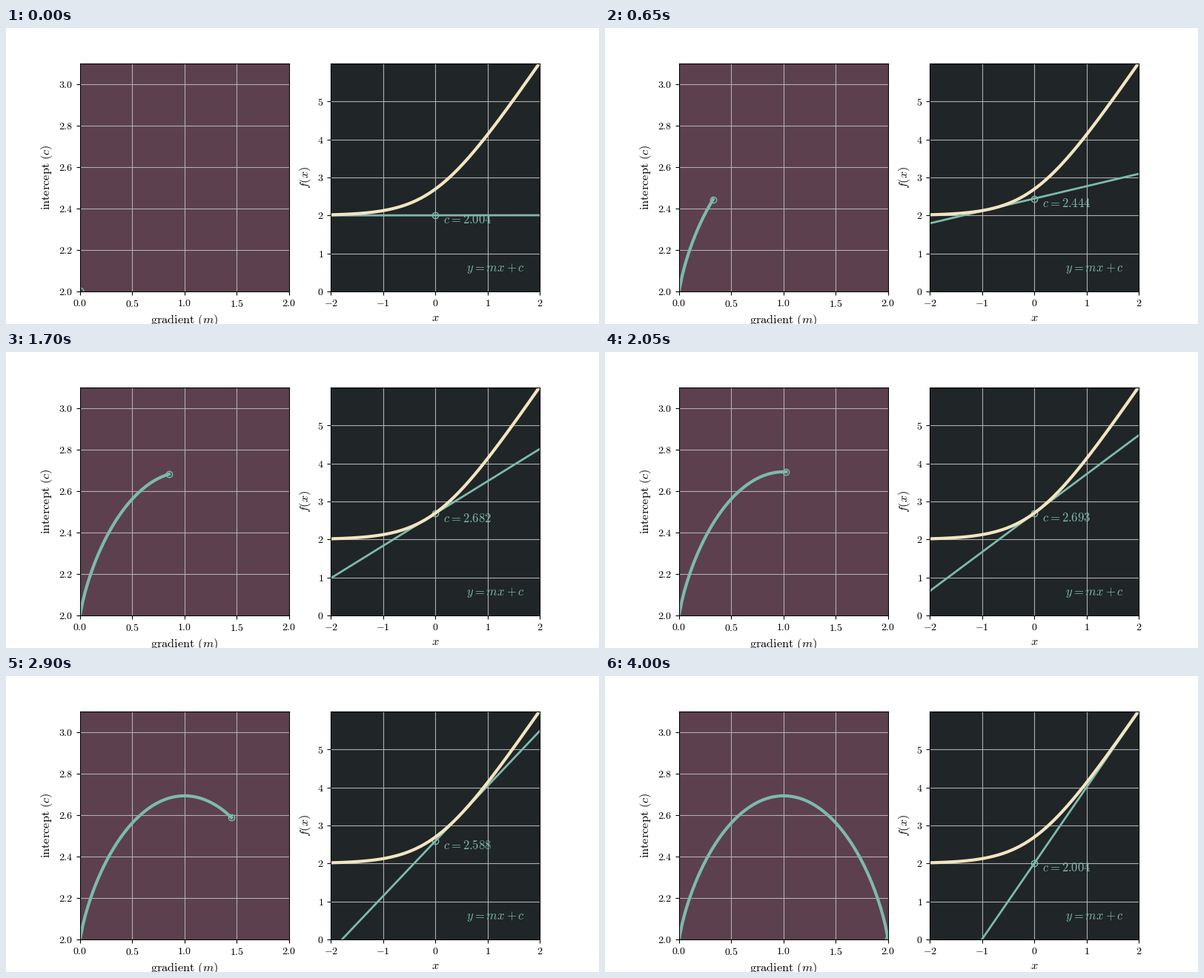
A matplotlib script that plays this animation: 800 px wide and 400 px high, repeating every 4.25 s.

```python
import numpy as np
import matplotlib.pyplot as plt
from matplotlib.animation import FuncAnimation

plt.rcParams.update({"mathtext.fontset": "cm", "font.family": "Liberation Serif"})

TEAL, CREAM = "#7dbaae", "#f3e5c1"
PLUM, DARK = "#5c404d", "#202527"
STEPS, HOLD = 81, 4


def softplus(x):
    return 2 + np.log1p(np.exp(2 * x))


def intercept(m):
    """Height at x = 0 of the tangent to softplus with gradient m."""
    p = m / 2
    return 2 - p * np.log(p) - (1 - p) * np.log(1 - p)


def style(ax, face, xlim, ylim, xticks, yticks, fmt, xlabel, ylabel):
    ax.set_facecolor(face)
    ax.set_xticks(xticks, [f"${v:{fmt}}$" for v in xticks])
    ax.set_yticks(yticks, [f"${v:{fmt}}$" for v in yticks])
    ax.set(xlim=xlim, ylim=ylim)
    ax.set_xlabel(xlabel, fontsize=11.75)
    ax.set_ylabel(ylabel, fontsize=11.75)
    ax.grid(True)


def ring(ax):
    return ax.plot([], [], "o", color=TEAL, mfc="none", ms=6)[0]


fig, (left, right) = plt.subplots(1, 2, figsize=(8, 4), dpi=100)
style(left, PLUM, (0, 2), (2, 3.1), np.arange(0, 2.1, 0.5),
      np.arange(2, 3.05, 0.2), ".1f",
      r"$\mathrm{gradient}\ (m)$", r"$\mathrm{intercept}\ (c)$")
style(right, DARK, (-2, 2), (0, 6), range(-2, 3), range(6), "d",
      "$x$", "$f(x)$")

grads = np.linspace(0.001, 1.999, STEPS)
cuts = intercept(grads)
ends = np.array([-2, 2])
xs = np.linspace(-2, 2, 200)

trace, = left.plot([], [], color=TEAL, lw=3)
tip = ring(left)
tangent, = right.plot([], [], color=TEAL, lw=2)
cross = ring(right)
right.plot(xs, softplus(xs), color=CREAM, lw=3)
label = right.text(0.15, 0, "", color=TEAL, fontsize=12)
right.text(0.6, 0.53, "$y = mx + c$", color=TEAL, fontsize=12)


def update(i):
    n = min(i, STEPS - 1)
    m, c = grads[n], cuts[n]
    trace.set_data(grads[:n + 1], cuts[:n + 1])
    tip.set_data([m], [c])
    tangent.set_data(ends, m * ends + c)
    cross.set_data([0], [c])
    label.set_y(c - 0.22)
    label.set_text(f"$c = {c:.3f}$")
    return trace, tip, tangent, cross, label


anim = FuncAnimation(fig, update, frames=STEPS + HOLD, interval=50, repeat=True)
plt.show()
```
